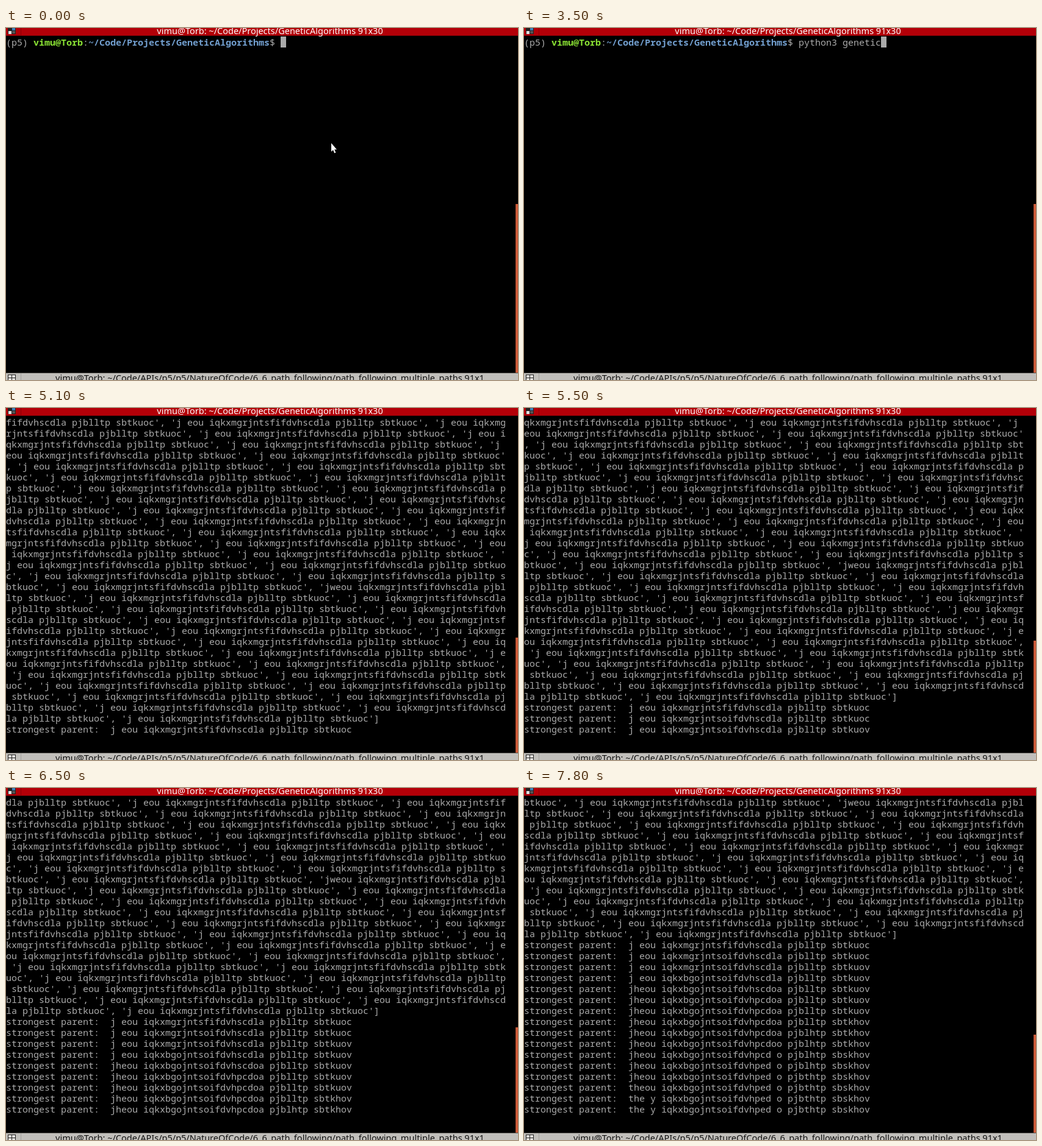
Recreate the animation shown at these times as an HTML page with a canvas. Size 839x578 px, loop 8000 ms.

```html
<!DOCTYPE html>
<html lang="en">
<head>
<meta charset="utf-8">
<title>Genetic algorithm in a terminal</title>
<style>
  html, body { margin: 0; width: 100%; height: 100%; overflow: hidden; background: #000; }
  canvas { display: block; }
</style>
</head>
<body>
<canvas id="stage" width="839" height="578"></canvas>
<script>
const ctx = document.getElementById('stage').getContext('2d');
const LOOP = 8000;
const COLS = 91, ROWS = 30, CELL = 9, LINE = 18, TOP = 14;
const GRAY = '#aaaaaa';
const MONO = '15px "Noto Sans Mono", monospace';
const TITLE = '14.5px "Noto Sans", sans-serif';

const HOST = 'vimu@Torb';
const FOLDER = '~/Code/Projects/GeneticAlgorithms';
const COMMAND = 'python3 genetic.py';

// [time, characters typed so far]
const KEYS = [[700, 2], [900, 3], [1000, 4], [1100, 5], [1300, 6], [1800, 8], [2200, 9],
  [2300, 11], [2500, 12], [2900, 14], [3500, 15], [3900, 17], [4500, 18]];
const RUN = 4600, SCROLLBACK = 4800, DUMP = 5000;
const PRINTS = [5100, 5300, 5500, 5700, 5900, 6000, 6200, 6400,
  6500, 6800, 6900, 7100, 7300, 7500, 7600, 7800];
const CURSOR_OFF = [[200, 400], [5100, 5900], [6300, 6900], [7500, LOOP]];

const PARENTS = [
  'j eou iqkxmgrjntsfifdvhscdla pjblltp sbtkuoc',
  'j eou iqkxmgrjntsoifdvhscdla pjblltp sbtkuoc',
  'j eou iqkxmgrjntsoifdvhscdla pjblltp sbtkuov',
  'j eou iqkxbgojntsoifdvhscdla pjblltp sbtkuov',
  'jheou iqkxbgojntsoifdvhscdoa pjblltp sbtkuov',
  'jheou iqkxbgojntsoifdvhpcdoa pjblltp sbtkuov',
  'jheou iqkxbgojntsoifdvhpcdoa pjblltp sbtkuov',
  'jheou iqkxbgojntsoifdvhpcdoa pjblltp sbtkhov',
  'jheou iqkxbgojntsoifdvhpcdoa pjblhtp sbtkhov',
  'jheou iqkxbgojntsoifdvhpcdoo pjblhtp sbtkhov',
  'jheou iqkxbgojntsoifdvhpcd o pjblhtp sbskhov',
  'jheou iqkxbgojntsoifdvhped o pjblhtp sbskhov',
  'jheou iqkxbgojntsoifdvhped o pjbthtp sbskhov',
  'theou iqkxbgojntsoifdvhped o pjbthtp sbskhov',
  'the y iqkxbgojntsoifdvhped o pjbthtp sbskhov',
  'the y iqkxbgojntsoifdvhped o pjbthtp sbskhov',
];

// A hundred near-identical members, wrapped at the terminal width.
const population = Array.from({ length: 100 }, (_, i) =>
  `'${i === 77 ? PARENTS[0].replace(' ', 'w') : PARENTS[0]}'`);
const listing = `[${population.join(', ')}]`.match(new RegExp(`.{1,${COLS}}`, 'g'));

function rect(color, x, y, w, h) {
  ctx.fillStyle = color;
  ctx.fillRect(x, y, w, h);
}

function print(text, col, row, color = GRAY, weight = '') {
  ctx.font = `${weight} ${MONO}`;
  ctx.fillStyle = color;
  ctx.fillText(text, col * CELL, TOP + row * LINE + 15);
}

function drawPrompt(typed) {
  const spans = [['(p5) '], [HOST, '#8ae234', 'bold'], [':'],
    [FOLDER, '#729fcf', 'bold'], ['$ ' + COMMAND.slice(0, typed)]];
  let col = 0;
  for (const [text, color, weight] of spans) {
    print(text, col, 0, color, weight);
    col += text.length;
  }
  return col;
}

function drawPointer(x, y) {
  ctx.beginPath();
  [[0, 0], [0, 14], [3, 11.2], [5.2, 16.5], [7.4, 15.5], [5.2, 10.6], [9, 10.4]]
    .forEach(([dx, dy]) => ctx.lineTo(x + dx, y + dy));
  ctx.closePath();
  ctx.fillStyle = '#fff';
  ctx.fill();
}

function drawTitle(text, baseline, color) {
  ctx.font = TITLE;
  ctx.fillStyle = color;
  ctx.textAlign = 'center';
  ctx.fillText(text, 432.5, baseline);
  ctx.textAlign = 'left';
}

function drawBars() {
  rect('#b30008', 0, 0, 839, 12);
  rect('#7c0006', 0, 12, 839, 1);
  rect('#8c0006', 24, 0, 1, 12);
  rect('#222', 3, 0, 13, 10);
  rect('#3d7fb5', 10, 0, 5, 4);
  rect('#ddd', 4, 5, 5, 5);
  rect('#555', 10, 5, 5, 4);
  drawTitle(`${HOST}: ${FOLDER} 91x30`, 10, '#fff');

  rect('#55534f', 0, 566, 839, 1);
  rect('#c1bfbb', 0, 567, 839, 11);
  rect('#a3a19d', 24, 567, 1, 11);
  rect('#222', 3, 569, 13, 9);
  for (const x of [4, 10]) {
    rect('#e4e2de', x, 570, 5, 4);
    rect('#e4e2de', x, 575, 5, 3);
  }
  drawTitle(`${HOST}: ~/Code/APIs/p5/p5/NatureOfCode/6_6_path_following/path_following_multiple_paths 91x1`,
    580, '#111');
}

function drawTerminal(t) {
  const typed = KEYS.reduce((n, [at, count]) => t >= at ? count : n, 0);
  const printed = PRINTS.filter(at => t >= at).length;
  let col = 0, row = 0;

  if (t < DUMP) {
    col = drawPrompt(typed);
    if (t >= RUN) {
      print('INITIAL POP', 0, 1);
      col = 0;
      row = 2;
    }
  } else {
    const parents = PARENTS.slice(0, printed).map(p => 'strongest parent:  ' + p);
    [...listing, ...parents].slice(1 - ROWS).forEach((text, i) => print(text, 0, i));
    row = ROWS - 1;
  }

  if (!CURSOR_OFF.some(([from, to]) => t >= from && t < to)) {
    rect(GRAY, col * CELL, TOP + row * LINE, CELL, LINE);
  }

  const lines = t < SCROLLBACK ? 60 : 87 + printed;
  const thumb = Math.round(553 * ROWS / lines);
  rect('#cb5a38', 835, 566 - thumb, 4, thumb);
}

function draw(t) {
  rect('#000', 0, 0, 839, 578);
  drawTerminal(t);
  drawBars();
  if (t < 200) drawPointer(533, 189);
  else if (t < 400) drawPointer(528, 180);
}

function tick() {
  draw(performance.now() % LOOP);
  requestAnimationFrame(tick);
}
tick();
</script>
</body>
</html>
```
